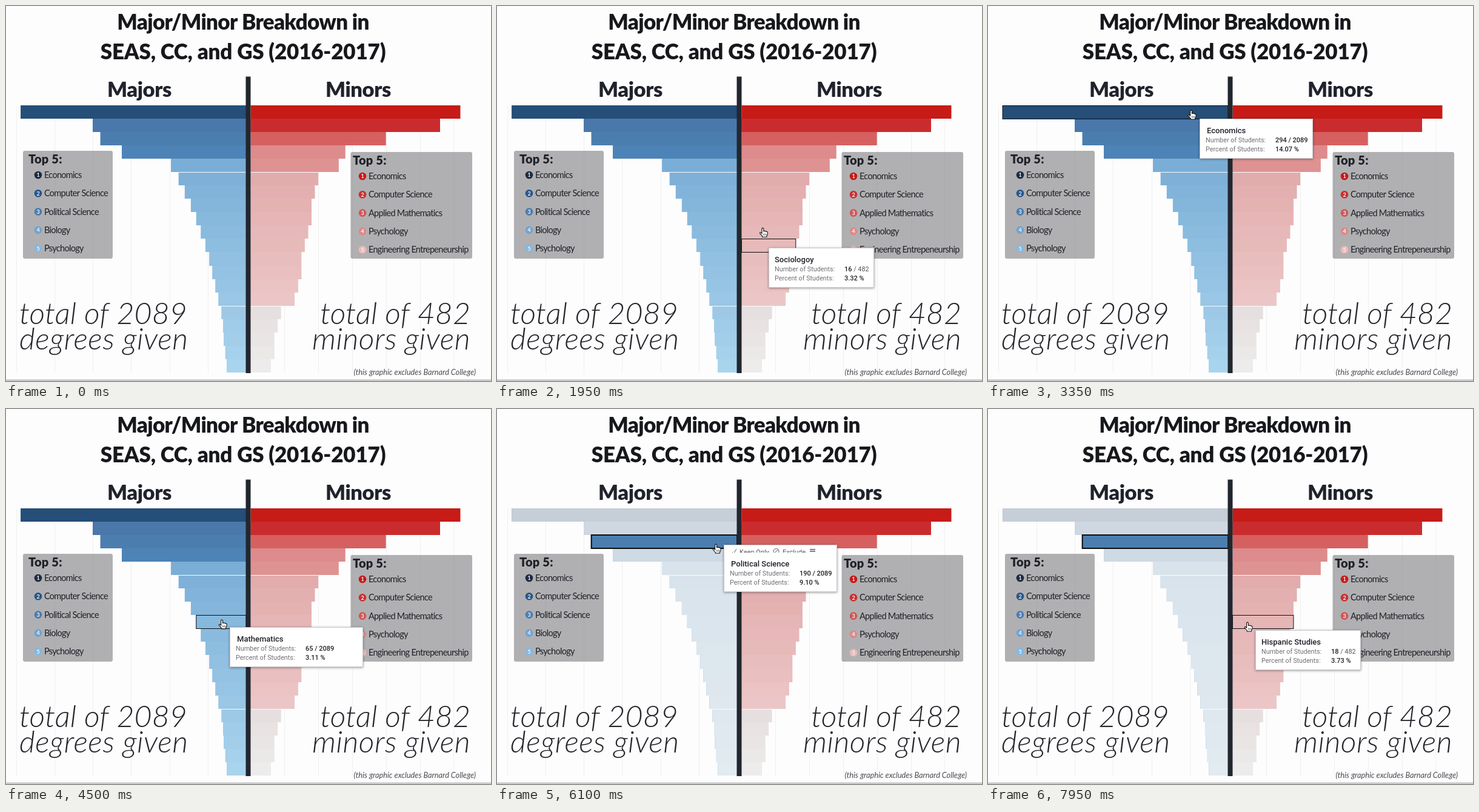
An HTML page with a canvas for the animation above (8000 ms loop, 800x619 px).

```html
<!DOCTYPE html>
<html lang="en">
<head>
<meta charset="utf-8">
<title>Major/Minor Breakdown</title>
<style>
  html, body { margin: 0; width: 100%; height: 100%; overflow: hidden; background: #fdfdfe; }
  canvas { display: block; }
</style>
</head>
<body>
<canvas id="stage" width="800" height="619"></canvas>
<script>
const ctx = document.getElementById('stage').getContext('2d');
const LOOP = 8000, STEP = 50, LAG = 50, CLICK = 5900, COMMANDS = 6000;
const ROWS = 20, ROW_TOP = 164.4, ROW_HEIGHT = 22.05, SELECTED_ROW = 2;
const INK = '#1f2128';
const wideTips = { Psychology: 195, Mathematics: 220 };

// The top five have their own counts, the rest fall off by rule.
// Bands are [first row, first colour, last colour].
const majors = {
  axis: 396, dir: -1, unit: 1.265, total: 2089, tipWidth: 187, grid: 50,
  top: [294, 200, 190, 162, 98],
  tail: i => i < 15 ? 88 * Math.exp(-.1 * (i - 5)) : 32 - 1.7 * (i - 15),
  bands: [[0, '#254e78', '#254e78'], [1, '#4a78aa', '#4d83b6'], [4, '#7baed6', '#a9d4ee']],
  names: ['Economics', 'Computer Science', 'Political Science', 'Biology', 'Psychology', 'English',
    'History', 'Neuroscience', 'Mathematics', 'Sociology', 'Philosophy', 'Anthropology', 'Art History',
    'Visual Arts', 'Statistics', 'Film Studies', 'Chemistry', 'Physics', 'Linguistics', 'Music']
};
const minors = {
  axis: 403.5, dir: 1, unit: 5.58, total: 482, tipWidth: 174, grid: 10,
  top: [62, 56, 40, 28, 26],
  tail: i => i < 15 ? 20 - .78 * (i - 5) : 9 - .8 * (i - 15),
  bands: [[0, '#c71b17', '#ca2c2d'], [2, '#d66060', '#d66060'], [3, '#dd8b8c', '#df9292'],
    [5, '#e2acad', '#ecc6c6'], [15, '#e6dfdf', '#edebeb']],
  names: ['Economics', 'Computer Science', 'Applied Mathematics', 'Psychology', 'Engineering Entrepeneurship',
    'History', 'Political Science', 'Philosophy', 'Hispanic Studies', 'Statistics', 'Sociologoy', 'Art History',
    'Biology', 'English', 'French', 'Music', 'Physics', 'Chemistry', 'Linguistics', 'Dance']
};

// Resting places of the pointer tip: [time, x, y]
const stops = [[0, 830, 405], [1300, 408, 540], [2500, 462, 231], [3350, 335, 172], [4475, 356, 347],
  [5100, 378, 527], [5800, 361, 223], [6150, 361, 223], [6900, 426, 504], [7600, 432, 309], [7900, 428, 352]];

const clamp = (v, lo, hi) => Math.min(hi, Math.max(lo, v));
const rowY = i => Math.floor(ROW_TOP + i * ROW_HEIGHT);
const countOf = (side, i) => side.top[i] ?? Math.round(side.tail(i));

function pointerAt(time) {
  const i = Math.max(1, stops.findIndex(s => s[0] >= time));
  const [a, b] = time > stops.at(-1)[0] ? stops.slice(-2) : [stops[i - 1], stops[i]];
  const u = clamp((time - a[0]) / (b[0] - a[0]), 0, 1);
  const k = u * u * (3 - 2 * u);
  return [a[1] + (b[1] - a[1]) * k, a[2] + (b[2] - a[2]) * k];
}

function text(str, x, y, font, color = INK, align = 'left', spacing = 0) {
  ctx.font = font;
  ctx.fillStyle = color;
  ctx.textAlign = align;
  ctx.letterSpacing = spacing + 'px';
  ctx.fillText(str, x, y);
  return ctx.measureText(str).width;
}

function rect(x, y, w, h, color, alpha = 1) {
  ctx.globalAlpha = alpha;
  ctx.fillStyle = color;
  ctx.fillRect(x, y, w, h);
  ctx.globalAlpha = 1;
}

function dot(x, y, r, color) {
  ctx.fillStyle = color;
  ctx.beginPath();
  ctx.arc(x, y, r, 0, 7);
  ctx.fill();
}

function barBox(side, i) {
  const w = countOf(side, i) * side.unit;
  return [side.dir < 0 ? side.axis - w : side.axis, rowY(i), w, rowY(i + 1) - rowY(i)];
}

function drawBars(side, faded) {
  for (let i = 1; i <= 6; i++)
    rect(Math.round(side.axis + side.dir * i * side.grid * side.unit), 165, 1, 441, '#f0f0f1');
  side.bands.forEach(([first, from, to], n) => {
    const end = side.bands[n + 1]?.[0] ?? ROWS;
    for (let i = first; i < end; i++) {
      const box = barBox(side, i);
      rect(...box, from);
      rect(...box, to, (i - first) / Math.max(1, end - 1 - first));
      if (faded && i !== SELECTED_ROW) rect(...box, '#f1f1f2', .79);
    }
  });
  for (const i of [5, 15]) {
    const [x, y, w] = barBox(side, i);
    rect(x, y, w, 1, '#fbfbfc');
  }
}

function outline(side, i, weight) {
  const [x, y, w, h] = barBox(side, i);
  ctx.strokeStyle = '#0b0d12';
  ctx.lineWidth = weight;
  ctx.strokeRect(x, y + weight % 2 / 2, w, h);
}

function legend(side, x, y, w, h, headX, dotX, colors) {
  ctx.fillStyle = 'rgba(125,126,129,.6)';
  ctx.beginPath();
  ctx.roundRect(x, y, w, h, 3);
  ctx.fill();
  text('Top 5:', headX, y + 21, '900 20px Lato, sans-serif', INK, 'left', .2);
  colors.forEach((color, i) => {
    const cy = y + 40 + i * 30.3;
    dot(dotX, cy, 6.3, color);
    text(i + 1, dotX, cy + 3.3, '700 9px Lato, sans-serif', '#f4f4f6', 'center');
    text(side.names[i], dotX + 10, cy + 5, '14.5px Lato, sans-serif', INK, 'left', -.7);
  });
}

function drawChart(faded) {
  rect(0, 0, 800, 619, '#fdfdfe');
  const title = '900 35px Lato, sans-serif', head = '900 34.5px Lato, sans-serif';
  text('Major/Minor Breakdown in', 391, 39, title, '#17181c', 'center', -.7);
  text('SEAS, CC, and GS (2016-2017)', 391, 88, title, '#17181c', 'center', -.2);
  text('Majors', 220, 150, head, '#20232c', 'center', -.4);
  text('Minors', 581, 150, head, '#20232c', 'center', -.4);
  drawBars(majors, faded);
  drawBars(minors, false);
  legend(majors, 28, 239, 148, 178, 37, 53, ['#1d2b42', '#28568a', '#4a7cb0', '#70a3d2', '#80b9e4']);
  legend(minors, 568.5, 241, 200.5, 176, 572, 588, ['#c71a18', '#c93030', '#d05555', '#df8888', '#ebb9b9']);
  const big = 'italic 300 50px Lato, sans-serif';
  text('total of 2089', 22, 525, big, '#25262b', 'left', .1);
  text('degrees given', 22, 567, big, '#25262b', 'left', .5);
  text('total of 482', 766, 525, big, '#25262b', 'right', .1);
  text('minors given', 766, 567, big, '#25262b', 'right', .5);
  text('(this graphic excludes Barnard College)', 775, 609, 'italic 12.7px Lato, sans-serif', '#4a4b50', 'right');
  rect(0, 617, 800, 1, '#8c8c90');
}

function hovered(x, y) {
  const i = Math.floor((y - ROW_TOP) / ROW_HEIGHT);
  if (i < 0 || i >= ROWS) return null;
  const side = x < 400 ? majors : minors;
  const [left, , w] = barBox(side, i);
  return x >= left && x <= left + w ? { side, i } : null;
}

function panel(x, y, w, h) {
  ctx.save();
  ctx.shadowColor = 'rgba(0,0,0,.4)';
  ctx.shadowBlur = 4;
  ctx.shadowOffsetY = 1;
  rect(x, y, w, h, '#fff');
  ctx.restore();
  ctx.strokeStyle = '#c9c9cc';
  ctx.lineWidth = 1;
  ctx.strokeRect(x + .5, y + .5, w - 1, h - 1);
}

// Command strip that slides up from behind the tooltip.
function drawCommands(x, y, w, rise) {
  ctx.save();
  ctx.beginPath();
  ctx.rect(x + 1, y - rise, w - 2, rise + 1);
  ctx.clip();
  ctx.translate(x, y - rise);
  const font = '11px Roboto, sans-serif', color = '#555';
  ctx.strokeStyle = color;
  ctx.stroke(new Path2D('M14 12l2 3 5-8M91 11a4.5 4.5 0 1 1-9 0a4.5 4.5 0 1 1 9 0M83 14l7-6'));
  text('Keep Only', 26, 16, font, color);
  text('Exclude', 97, 16, font, color);
  for (let i = 0; i < 3; i++) rect(142, 7 + i * 3, 9, 1.5, color);
  ctx.restore();
}

function drawTooltip({ side, i }, x, y, rise) {
  const name = side.names[i], count = countOf(side, i), isMajor = side === majors;
  const w = wideTips[name] ?? side.tipWidth;
  const bold = '500 11px Roboto, sans-serif', plain = '10.8px Roboto, sans-serif';
  const valueX = x + 125, label = '#707074';
  panel(x, y - rise, w, 66 + rise);
  if (rise) drawCommands(x, y, w, rise);
  text(name, x + (isMajor ? 12 : 10), y + 24, '500 13px Roboto, sans-serif');
  text('Number of Students:', x + 10, y + 39, plain, label);
  text('Percent of Students:', x + 10, y + 53.5, plain, label);
  const used = text(count, valueX, y + 39, bold);
  text(' / ' + side.total, valueX + used, y + 39, isMajor ? bold : plain, isMajor ? INK : '#55565a');
  text((100 * count / side.total).toFixed(2) + ' %', valueX, y + 53.5, bold);
}

const hand = new Path2D('M-1.4 1Q0-.8 1.4 1V5.6Q3 4.6 4.2 5.7Q5.8 4.8 6.3 6.5Q8 5.8 8 8V10.5L6.5 13.5V15H-.8V13.5L-4.6 9.4Q-5.4 7-3.3 7.6L-1.4 9.4Z');
function drawPointer(x, y) {
  ctx.save();
  ctx.translate(x, y);
  ctx.fillStyle = '#fff';
  ctx.strokeStyle = '#111';
  ctx.lineWidth = 1.1;
  ctx.lineJoin = 'round';
  ctx.fill(hand);
  ctx.stroke(hand);
  for (const fingerX of [1, 3, 5]) rect(fingerX, 9.5, .8, 3, '#333');
  ctx.restore();
}

function draw(time) {
  const clicked = time >= CLICK;
  drawChart(clicked);
  const [hx, hy] = pointerAt(Math.max(0, time - LAG));
  const hover = hovered(hx, hy);
  if (hover) outline(hover.side, hover.i, 1);
  if (clicked) outline(majors, SELECTED_ROW, 2);
  rect(395.5, 116.5, 8, 489.5, '#22272f');
  if (hover) {
    const onSelected = clicked && hover.side === majors && hover.i === SELECTED_ROW;
    const rise = onSelected ? clamp((time - COMMANDS) * .12, 0, 26) : 0;
    drawTooltip(hover, Math.round(hx + 13), Math.round(hy + 13), rise);
  }
  drawPointer(...pointerAt(time));
}

function frame() {
  draw(Math.floor(performance.now() % LOOP / STEP) * STEP);
  requestAnimationFrame(frame);
}
frame();
</script>
</body>
</html>
```
